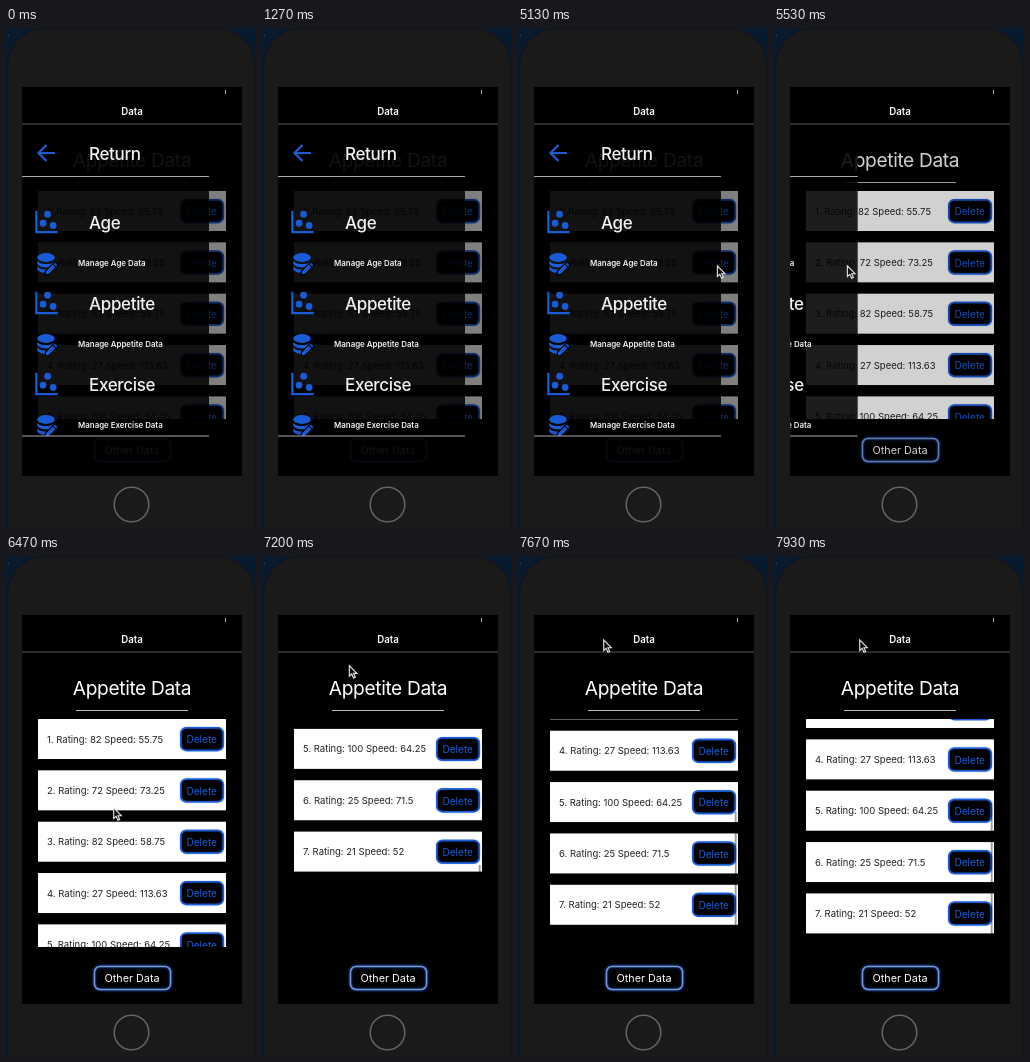
An HTML page with a canvas that plays this animation: 250 px wide and 500 px high, repeating every 8 s.

```html
<!DOCTYPE html>
<html lang="en">
<head>
<meta charset="utf-8">
<title>Data drawer</title>
<style>
html, body { margin: 0; width: 100%; height: 100%; overflow: hidden; background: #06121f; }
canvas { display: block; width: 250px; height: 500px; }
</style>
</head>
<body>
<canvas id="stage"></canvas>
<script>
const canvas = document.getElementById('stage');
const ctx = canvas.getContext('2d');
const ratio = window.devicePixelRatio || 1;
canvas.width = 250 * ratio;
canvas.height = 500 * ratio;

const LOOP = 8000;
const BLUE = '#1a5cd6';
const SCREEN = { x: 16, y: 59, w: 220, h: 389 };
const LIST = { x: 32, y: 163, w: 188, h: 228 };
const DRAWER_W = 187, PITCH = 51.35, MAX_SCROLL = 131.5;
const DRAG = { start: 5130, end: 5600 };
const PULL = { start: 6870, end: 7230 };

const entries = [[82, 55.75], [72, 73.25], [82, 58.75], [27, 113.63], [100, 64.25], [25, 71.5], [21, 52]];
const sections = ['Age', 'Appetite', 'Exercise'];

// time, x, y of the pointer tip
const pointerPath = [
  [3670, 205, 205], [3730, 165, 214], [3930, 165, 214], [4730, 199, 237], [5130, 199, 237],
  [5530, 73, 237], [5600, 51, 238], [5700, 45, 240], [5930, 45, 240], [6400, 107, 251],
  [6480, 107, 251], [6800, 105, 402], [6870, 105, 402], [7230, 85, 83]
];

function pointerAt(t) {
  if (t < pointerPath[0][0]) return null;
  const i = pointerPath.findIndex(p => p[0] > t);
  if (i < 0) return pointerPath[pointerPath.length - 1].slice(1);
  const [t0, x0, y0] = pointerPath[i - 1], [t1, x1, y1] = pointerPath[i];
  const k = (t - t0) / (t1 - t0);
  return [x0 + (x1 - x0) * k, y0 + (y1 - y0) * k];
}

function drawerOffset(t) {
  if (t < DRAG.start) return 0;
  const held = Math.min(0, pointerAt(Math.min(t, DRAG.end))[0] - 192);
  if (t <= DRAG.end) return held;
  const k = Math.min(1, (t - DRAG.end) / 330);
  return held + (-DRAWER_W - held) * (1 - (1 - k) ** 3);
}

function pulledScroll(t) {
  const moved = 402 - pointerAt(t)[1];
  const over = moved - MAX_SCROLL;
  if (over <= 0) return moved;
  return MAX_SCROLL + LIST.h * (1 - 1 / (over * 0.55 / LIST.h + 1));
}

function scrollAt(t) {
  if (t < PULL.start) return 0;
  if (t <= PULL.end) return pulledScroll(t);
  const x = (t - PULL.end) * 0.0076;
  return MAX_SCROLL + (pulledScroll(PULL.end) - MAX_SCROLL) * (1 + x) * Math.exp(-x);
}

function text(str, x, y, size, color, { weight = 400, align = 'left', track = 0 } = {}) {
  ctx.font = `${weight} ${size}px Inter, "Open Sans", sans-serif`;
  ctx.letterSpacing = track * size + 'px';
  ctx.textAlign = align;
  ctx.fillStyle = color;
  ctx.fillText(str, x, y);
}

function rect(x, y, w, h, color) {
  ctx.fillStyle = color;
  ctx.fillRect(x, y, w, h);
}

function clipTo(x, y, w, h, draw) {
  ctx.save();
  ctx.beginPath();
  ctx.rect(x, y, w, h);
  ctx.clip();
  draw();
  ctx.restore();
}

function button(x, y, w, h, border, glow) {
  ctx.save();
  ctx.beginPath();
  ctx.roundRect(x, y, w, h, 5.5);
  ctx.fillStyle = '#000';
  ctx.strokeStyle = border;
  ctx.lineWidth = 1.5;
  ctx.shadowColor = BLUE;
  ctx.shadowBlur = glow * ratio;
  ctx.fill();
  ctx.stroke();
  ctx.restore();
}

function disc(x, y, r) {
  ctx.beginPath();
  ctx.arc(x, y, r, 0, Math.PI * 2);
  ctx.fill();
}

function drawPhone() {
  rect(0, 0, 250, 500, '#071a2e');
  rect(2, 7, 1, 1, '#3c5a7a');
  ctx.beginPath();
  ctx.roundRect(1.5, 0.5, 247, 540, 37);
  ctx.fillStyle = '#1a1a1b';
  ctx.fill();
  ctx.strokeStyle = '#101214';
  ctx.lineWidth = 1;
  ctx.stroke();
  rect(SCREEN.x, SCREEN.y, SCREEN.w, SCREEN.h, '#000');
  ctx.beginPath();
  ctx.arc(125.5, 476.5, 17.3, 0, Math.PI * 2);
  ctx.strokeStyle = '#626264';
  ctx.lineWidth = 1.6;
  ctx.stroke();
}

function drawHeader() {
  text('Data', 126, 86.6, 9.7, '#fff', { weight: 600, align: 'center' });
  rect(219, 62, 1, 4, '#aaa');
  rect(SCREEN.x, 95.5, SCREEN.w, 1, '#555');
}

function drawRow([rating, speed], i, y) {
  rect(LIST.x, y, LIST.w, 40, '#fff');
  text(`${i + 1}. Rating: ${rating} Speed: ${speed}`, 41, y + 23.6, 9.5, '#222');
  button(174.8, y + 8.8, 42.5, 22.6, BLUE, 1);
  text('Delete', 195.7, y + 24.3, 10.1, BLUE, { align: 'center' });
}

function drawPage(scroll) {
  text('Appetite Data', 126, 138.8, 19.2, '#fff', { align: 'center', track: -0.02 });
  rect(70, 154, 112, 1, '#bbb');
  clipTo(LIST.x, LIST.y, LIST.w, LIST.h, () => {
    entries.forEach((entry, i) => drawRow(entry, i, LIST.y + i * PITCH - scroll));
    if (scroll > 0) {
      const size = 145 - Math.max(0, scroll - MAX_SCROLL);
      const room = LIST.h - size - 1;
      const top = LIST.y + room * Math.min(1, scroll / MAX_SCROLL);
      rect(216.8, top, 1.8, size, 'rgba(0,0,0,.4)');
    }
  });
  button(88.5, 410.5, 76, 23, '#7898d0', 3);
  text('Other Data', 126, 426.2, 10.8, '#fff', { align: 'center' });
}

function drawArrow() {
  ctx.strokeStyle = BLUE;
  ctx.lineWidth = 2.2;
  ctx.stroke(new Path2D('M49 125H33M40.5 117L32.5 125L40.5 133'));
}

function drawScatter(y) {
  ctx.save();
  ctx.translate(27, y);
  ctx.scale(1.12, 1.12);
  ctx.fillStyle = BLUE;
  ctx.fill(new Path2D('M2 2H4V20H22V22H2Z'));
  [[9, 13], [13, 5], [18, 15]].forEach(([cx, cy]) => disc(cx, cy, 3));
  ctx.restore();
}

function drawDatabase(y) {
  ctx.save();
  ctx.translate(26.8, y);
  ctx.scale(1.1, 1.1);
  ctx.fillStyle = BLUE;
  ctx.beginPath();
  ctx.ellipse(12, 7, 8, 4, 0, 0, Math.PI * 2);
  ctx.fill();
  const band = new Path2D('M4 9V12C4 14.2 7.6 16 12 16S20 14.2 20 12V9C20 11.2 16.4 13 12 13S4 11.2 4 9Z');
  ctx.fill(band);
  ctx.translate(0, 5);
  ctx.fill(band);
  ctx.translate(0, -5);
  const pencil = new Path2D('M12 22V19.7L18.1 13.6L20.4 15.9L14.3 22ZM18.9 12.8L20 11.7L22.3 14L21.2 15.1Z');
  ctx.strokeStyle = '#060606';
  ctx.lineWidth = 2.4;
  ctx.stroke(pencil);
  ctx.fill(pencil);
  ctx.restore();
}

function drawDrawer(offset) {
  const shown = 1 + offset / DRAWER_W;
  if (shown <= 0) return;
  clipTo(SCREEN.x, 97, SCREEN.w, 351, () => {
    rect(SCREEN.x, 97, SCREEN.w, 351, `rgba(0,0,0,${0.5 * shown})`);
    ctx.translate(offset, 0);
    rect(SCREEN.x, 97, DRAWER_W, 351, 'rgba(0,0,0,.86)');
    drawArrow();
    const heading = { weight: 500, track: -0.02 };
    text('Return', 83, 131.8, 17, '#f2f2f2', heading);
    rect(SCREEN.x, 148, DRAWER_W, 1, '#aaa');
    clipTo(SCREEN.x, 149, DRAWER_W, 259, () => sections.forEach((name, i) => {
      const y = i * 81;
      drawScatter(180.6 + y);
      text(name, 83, 201 + y, 17, '#f2f2f2', heading);
      drawDatabase(221.8 + y);
      text(`Manage ${name} Data`, 72, 238 + y, 7.9, '#f2f2f2', { weight: 600 });
    }));
    rect(SCREEN.x, 407.5, DRAWER_W, 1, '#aaa');
  });
}

function drawPointer(pos) {
  if (!pos) return;
  ctx.save();
  ctx.translate(pos[0] + 0.7, pos[1] + 0.9);
  const arrow = new Path2D('M0 0V10.6L2.4 8.4L4.2 12.4L6 11.6L4.3 7.8H7.6Z');
  ctx.fillStyle = '#111';
  ctx.fill(arrow);
  ctx.strokeStyle = '#e8e8e8';
  ctx.lineWidth = 1.1;
  ctx.stroke(arrow);
  ctx.restore();
}

function render(t) {
  ctx.setTransform(ratio, 0, 0, ratio, 0, 0);
  drawPhone();
  drawPage(scrollAt(t));
  drawDrawer(drawerOffset(t));
  drawHeader();
  drawPointer(pointerAt(t));
}

const started = performance.now();
function tick() {
  render((performance.now() - started) % LOOP);
  requestAnimationFrame(tick);
}
tick();
</script>
</body>
</html>
```
